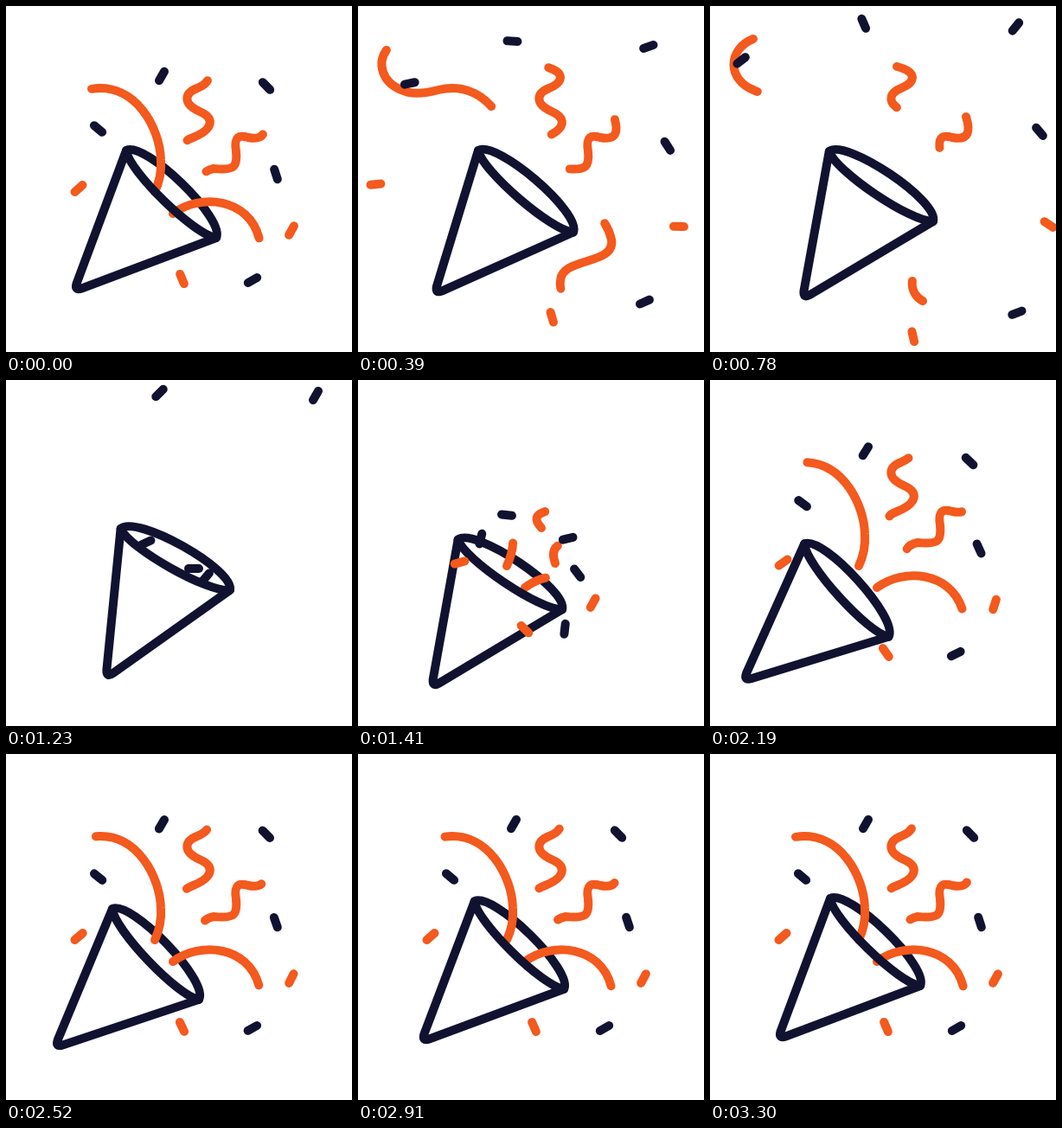
An HTML page with a canvas that plays this animation: 400x400 px, repeating every 5.33 s.

```html
<!DOCTYPE html>
<html lang="en">
<head>
<meta charset="utf-8">
<title>Party popper</title>
<style>
  html, body { margin: 0; width: 100%; height: 100%; overflow: hidden; background: #fff; }
  canvas { display: block; width: 100vw; height: 100vh; }
</style>
</head>
<body>
<canvas id="stage" width="400" height="400"></canvas>
<script>
const ctx = document.getElementById('stage').getContext('2d');
const NAVY = '#11122f', ORANGE = '#f4591d';
const LOOP = 5330, STEP = 30, END = 3300, BURST = 1350;

const clamp = x => Math.max(0, Math.min(1, x));
const mix = (a, b, k) => a + (b - a) * k;
const span = (t, a, b) => clamp((t - a) / (b - a));
const smooth = x => x * x * (3 - 2 * x);
const easeOut = (x, p) => 1 - Math.pow(1 - x, p);
const decay = (t, tau) => Math.exp(-(t - BURST) / tau);

// Ribbons slide along fixed paths; [from, to] is the visible part at rest.
function ribbon(d, from, to, tau, outTime, outPow) {
  const el = document.createElementNS('http://www.w3.org/2000/svg', 'path');
  el.setAttribute('d', d);
  return { path: new Path2D(d), len: el.getTotalLength(), from, to, tau, outTime, outPow };
}
const arcs = [
  ribbon('M172 215C178 202 180 192 179 178C178 140 148 84 93 97C78 101 62 103 50 97C20 85 20 50 50 38',
    0, 0.565, 334, 1090, 1),
  ribbon('M193 240C225 216 282 222 293 270C298 300 236 290 234 317C232 330 240 338 246 341',
    0, 0.52, 245, 886, 1)
];
const squiggles = [
  ribbon('M212 171C203 161 206 156 214 153C240 143 242 130 224 122C204 113 206 101 221 95C238 88 240 76 216 70',
    0.12, 0.82, 265, 1150, 2),
  ribbon('M228 212C222 196 230 190 240 188C262 190 268 188 266 168C263 150 270 149 280 152C300 156 301 144 296 128',
    0.16, 0.85, 300, 1150, 2)
];

// pos/angle: rest; out/spin: flight; gone: when it vanishes; from/twist: burst start; park: waiting pose
const dashes = [
  { color: NAVY, pos: [180, 81], angle: -60, out: [177.5, 15], spin: 195, spinPow: 1, gone: 1290, from: [169, 184], twist: 87 },
  { color: NAVY, pos: [301, 92.5], angle: 46, out: [358, 18], spin: -106, gone: 1290, from: [221, 217], twist: -78 },
  { color: NAVY, pos: [312, 194.5], angle: 72, out: [387, 141], spin: -24, gone: 1020, from: [232, 234], twist: -260, park: [231, 228, -50] },
  { color: NAVY, pos: [285, 317], angle: -30, out: [361, 358], spin: 10, gone: 1020, from: [222, 277], twist: 165, park: [217, 218, 0] },
  { color: NAVY, pos: [106.5, 142], angle: 40, out: [30, 56], spin: -85, gone: 1140, from: [155, 199], twist: -152, park: [162, 188, -25] },
  { color: ORANGE, pos: [330, 259.5], angle: -61, out: [397, 252], spin: 103, gone: 900, from: [250, 257], twist: -470 },
  { color: ORANGE, pos: [203.5, 315.5], angle: 67, out: [237.5, 388], spin: 11, gone: 1140, from: [189, 278], twist: -500 },
  { color: ORANGE, pos: [84, 211], angle: -42, out: [-20, 203], spin: 60, gone: 720, from: [130, 211], twist: 270 }
];

const rimBack = new Path2D('M139 167C161 156 254 246 243 268');
const body = new Path2D('M243 268C218 265 142 191 139 167L81.5 321Q79 329.5 87.5 326.5Z');

function drawRibbon(r, t) {
  let a, b;
  if (t < BURST) {
    a = mix(r.from, 1, Math.pow(clamp(t / r.outTime), r.outPow));
    b = mix(r.to, 1, easeOut(clamp(t / 750), 2.4));
  } else {
    const k = decay(t, r.tau);
    a = r.from * clamp(1 - 4 * k);
    b = r.to * (1 - k);
  }
  if (b - a < 0.004) return;
  ctx.strokeStyle = ORANGE;
  ctx.setLineDash([(b - a) * r.len, r.len * 2]);
  ctx.lineDashOffset = -a * r.len;
  ctx.stroke(r.path);
  ctx.setLineDash([]);
}

function dashPose(d, t) {
  if (t < d.gone) {
    const x = clamp(t / 1200), k = easeOut(x, 2.4);
    return [mix(d.pos[0], d.out[0], k), mix(d.pos[1], d.out[1], k),
      d.angle + d.spin * easeOut(x, d.spinPow || 2.4)];
  }
  if (t < BURST) return d.park;
  const k = decay(t, 190);
  return [mix(d.pos[0], d.from[0], k), mix(d.pos[1], d.from[1], k),
    d.angle + d.twist * decay(t, 225)];
}

function drawDash(d, t) {
  const pose = dashPose(d, t);
  if (!pose) return;
  const [x, y, deg] = pose, a = deg * Math.PI / 180;
  const dx = Math.cos(a) * 6, dy = Math.sin(a) * 6;
  ctx.strokeStyle = d.color;
  ctx.beginPath();
  ctx.moveTo(x - dx, y - dy);
  ctx.lineTo(x + dx, y + dy);
  ctx.stroke();
}

function conePose(t) {
  let deg, slide;
  if (t < BURST) {
    deg = -14.8 * smooth(span(t, 0, 1240));
    slide = 8 * smooth(span(t, 600, 1250));
  } else {
    deg = t < 2000
      ? mix(-14.8, 4, easeOut(span(t, BURST, 2000), 2.8))
      : 4 * (1 - smooth(span(t, 2000, 3100)));
    slide = t < 1650
      ? mix(8, 67, easeOut(span(t, BURST, 1650), 2))
      : 67 * (1 - Math.sin(Math.pow(span(t, 1650, END), 1.1) * Math.PI / 2));
  }
  return { turn: deg * Math.PI / 180, slide };
}

function drawCone(path, { turn, slide }) {
  ctx.save();
  ctx.translate(139 - 0.8 * slide, 167 + 0.6 * slide);
  ctx.rotate(turn);
  ctx.translate(-139, -167);
  ctx.strokeStyle = NAVY;
  ctx.stroke(path);
  ctx.restore();
}

function draw(t) {
  ctx.fillStyle = '#fff';
  ctx.fillRect(0, 0, 400, 400);
  ctx.lineWidth = 10;
  ctx.lineCap = ctx.lineJoin = 'round';
  const cone = conePose(t);
  drawCone(rimBack, cone);
  arcs.forEach(r => drawRibbon(r, t));
  drawCone(body, cone);
  squiggles.forEach(r => drawRibbon(r, t));
  dashes.forEach(d => drawDash(d, t));
}

const start = performance.now();
function tick() {
  const t = Math.floor((performance.now() - start) % LOOP / STEP) * STEP;
  draw(t >= END ? 0 : t);
  requestAnimationFrame(tick);
}
tick();
</script>
</body>
</html>
```
